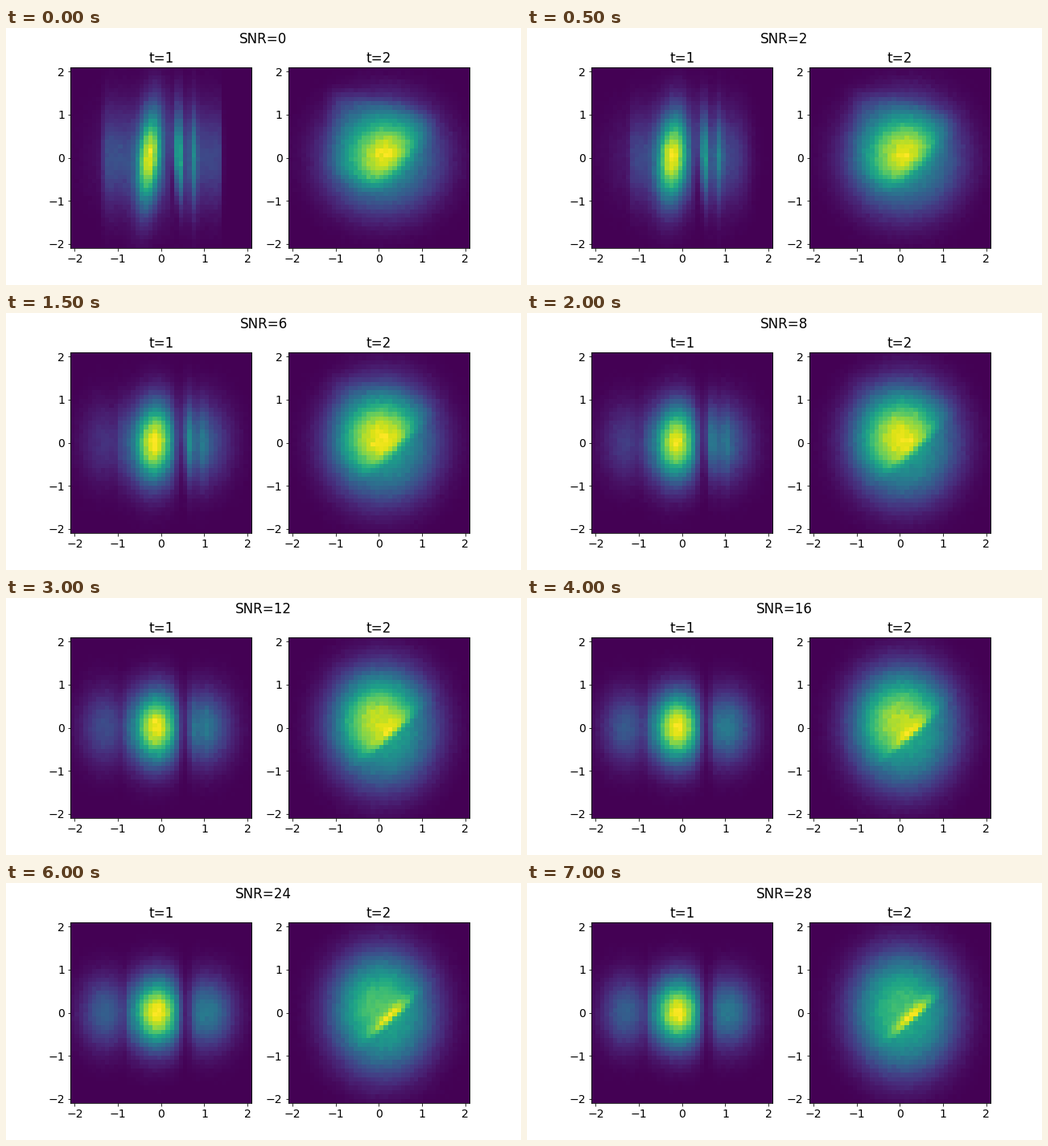
Animation, 640 px wide and 320 px high, one loop 7500 ms. Source, as a matplotlib script:

```python
import numpy as np
import matplotlib.pyplot as plt
from matplotlib.animation import FuncAnimation

FRAMES, INTERVAL, SNR_STEP = 15, 500, 2
BINS, LIM = 42, 2.1

axis = -LIM + 0.1 * (np.arange(BINS) + 0.5)
X, Y = np.meshgrid(axis, axis)


def bell(u):
    return np.exp(-u**2 / 2)


def step(u):
    return 1 / (1 + np.exp(-u))


def settle(snr):
    """Return a mixer that eases from a noisy to a clean value."""
    ease = 1 - np.exp(-snr / 6)
    return lambda noisy, clean: noisy + (clean - noisy) * ease


def sampled(density, rng):
    """Add counting noise and scale the peak to one."""
    density = density / density.max()
    noise = 0.018 * np.sqrt(density) * rng.standard_normal(density.shape)
    density = np.clip(density + noise, 0, None)
    return density / density.max()


def stripes(snr):
    mix = settle(snr)
    early = mix(1, 0)
    left_wall = step((X - mix(-1.35, -0.8)) / 0.03)
    right_wall = step((mix(1.4, 1.7) - X) / mix(0.02, 0.3))
    gap = mix(0.2, 0.57)

    main = bell((X - mix(-0.28, -0.1) - 0.08 * early * Y) / mix(0.18, 0.4))
    shelf = 0.28 * early * right_wall
    left = (0.05 + 0.27 * mix(0, 1) ** 2) * bell((X + 1.3) / 0.38)
    right = mix(0, 0.4) * bell((X - mix(0.5, 1.1)) / 0.4)
    streaks = early * (0.65 * bell((X - gap - 0.2) / 0.06)
                       + 0.35 * bell((X - gap - 0.55) / 0.06))

    # The gap leans and only opens below the middle while the signal is noisy.
    depth = 0.8 * mix(step(-3 * Y), 1)
    dip = 1 - depth * bell((X - gap + 0.1 * early * Y) / mix(0.08, 0.12))
    profile = left + (main + shelf) * left_wall + right + streaks
    return profile * dip * bell(Y / mix(0.78, 0.54))


def blob(snr):
    mix = settle(snr)
    slope = mix(1, 0.85)
    dist = (Y - slope * X - mix(-0.65, -0.4)) / np.hypot(1, slope)
    above = step(dist / mix(0.12, 0.03))

    r2 = ((X - 0.08) / mix(0.95, 0.85)) ** 2 + (Y / mix(0.9, 1)) ** 2
    base = 0.53 * np.exp(-(r2 / 2) ** 1.4)
    plate = mix(0.15, 0) * np.exp(-((X - 0.1) / 1.2) ** 8
                                  - (Y + 0.25 * X - 0.3) ** 8)

    # Height moves steadily from the round lobe to the ridge along the cut.
    ridge = 0.4 * snr / 28
    lobe = (0.47 - ridge) * bell(np.hypot(X - mix(0.2, -0.1), Y - mix(0, 0.2))
                                 / mix(0.5, 0.6))
    crest = ridge * np.exp(-(dist / mix(0.4, 0.2)) ** 2) * bell((X - 0.27) / 0.33)
    return base + above * (plate + lobe + crest)


plt.rcParams["font.size"] = 14
fig, axes = plt.subplots(1, 2, figsize=(640 / 72, 320 / 72), dpi=72)
heading = fig.suptitle("SNR=0", y=0.985)
images = []
for t, ax in enumerate(axes, 1):
    images.append(ax.imshow(np.zeros((BINS, BINS)), origin="lower",
                            extent=(-LIM, LIM, -LIM, LIM), vmin=0, vmax=1,
                            cmap="viridis", interpolation="nearest"))
    ax.set_title(f"t={t}")
    ax.set_xticks(range(-2, 3))
    ax.set_yticks(range(-2, 3))


def update(i):
    snr = SNR_STEP * i
    rng = np.random.default_rng(100 + i)
    heading.set_text(f"SNR={snr}")
    for image, density in zip(images, (stripes, blob)):
        image.set_data(sampled(density(snr), rng))
    return [heading, *images]


anim = FuncAnimation(fig, update, frames=FRAMES, interval=INTERVAL,
                     init_func=lambda: update(0), repeat=True, repeat_delay=0)
plt.show()
```
